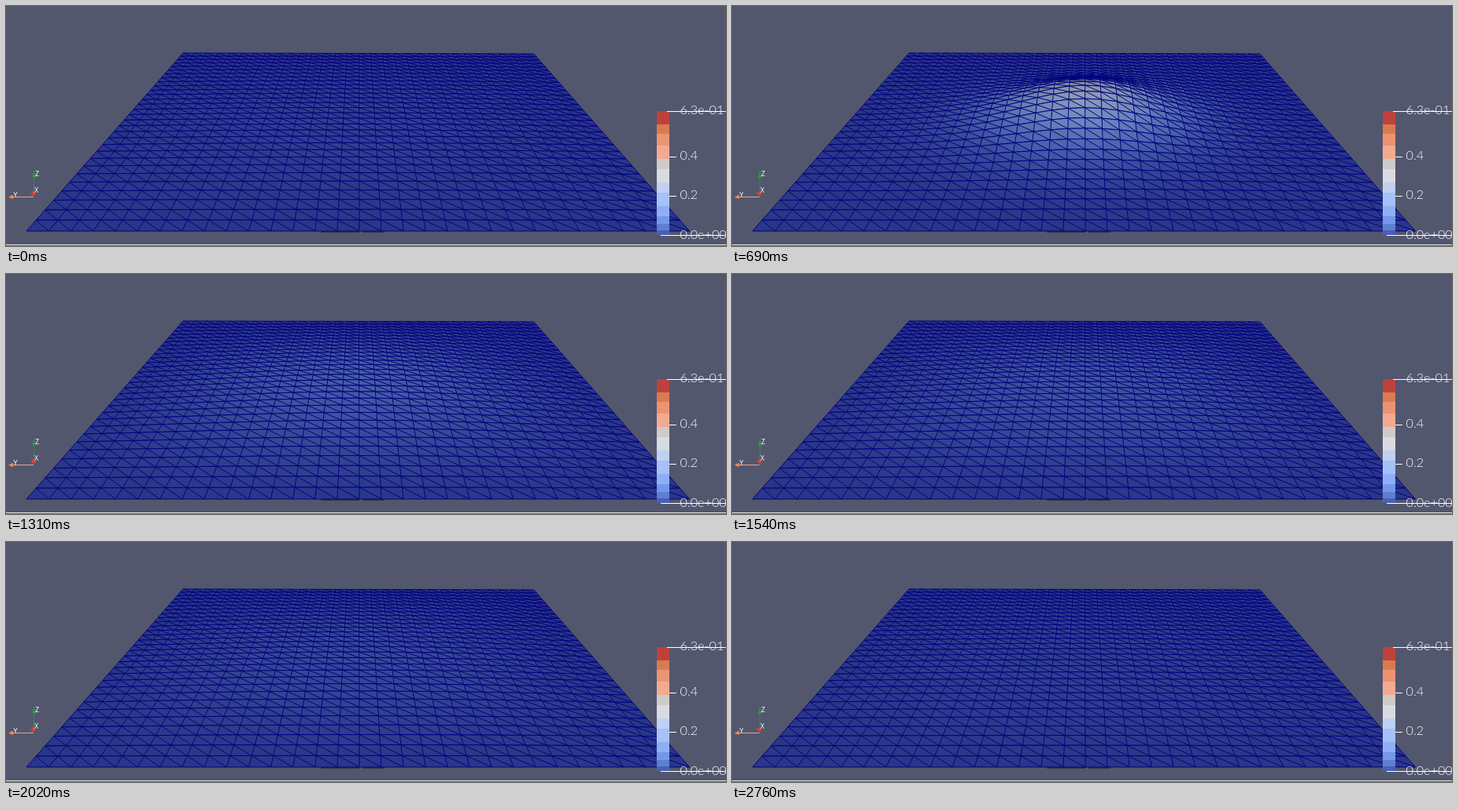
An HTML page with a canvas for the animation above (2840 ms loop, 915 by 306 pixels).

```html
<!DOCTYPE html>
<html lang="en">
<head>
<meta charset="utf-8">
<title>Heat diffusion</title>
<style>
html, body { margin: 0; width: 100%; height: 100%; overflow: hidden; background: #52576e; }
canvas, svg { position: absolute; left: 0; top: 0; display: block; }
.scale { font: 300 16.2px Lato, "Open Sans", sans-serif; fill: #fff; }
.axis { font: 9px "Open Sans", Arial, sans-serif; fill: #fff; }
</style>
</head>
<body>
<canvas id="view" width="915" height="306"></canvas>
<svg width="915" height="306" viewBox="0 0 915 306">
  <path d="M400 288H449M453 288H481" stroke="#10101c"/>
  <path d="M0 304.5H915" stroke="#eeeef0"/>
  <g id="bar" shape-rendering="crispEdges"></g>
  <path d="M840 134.5H915M843 192.5H852M843 242.5H852M832 292.5H915" stroke="#fff" fill="none"/>
  <g class="scale">
    <text x="856.5" y="138">6.3e-01</text>
    <text x="856.5" y="196">0.4</text>
    <text x="856.5" y="246">0.2</text>
    <text x="856.5" y="296.5">0.0e+00</text>
  </g>
  <path d="M8 243.5H35" stroke="#e5a58c"/>
  <path d="M3 243.5L9 240.8V246.2Z" fill="#ee8a55"/>
  <path d="M35.5 240V216" stroke="#3d8a4c"/>
  <path d="M35.5 210L38 219H33Z" fill="#2a9a38"/>
  <circle cx="35" cy="239" r="2.8" fill="#c8483e"/>
  <g class="axis">
    <text x="9.5" y="244">Y</text>
    <text x="37" y="217">Z</text>
    <text x="36" y="238">X</text>
  </g>
</svg>
<script>
const N = 30, SIDE = 4, DT = 0.04, MAX = 0.63;
const LOOP = 2840, START = 510, STEPS = 50;
const ticks = [0, 70, 150, 230, 300, 370, 450, 540, 620, 690, 770, 850,
  1000, 1080, 1160, 1230, 1310, 1390, 1470, 1540, 1630, 1700, 1780, 1860, 1940, 2020,
  2120, 2200, 2280, 2360, 2440, 2520, 2600, 2670, 2760];
const coolWarm = [[59, 76, 192], [98, 130, 234], [141, 176, 254], [184, 208, 249],
  [221, 221, 221], [245, 196, 173], [244, 152, 122], [222, 96, 77], [180, 4, 38]];
const ctx = document.getElementById('view').getContext('2d');

// Legend: bottom edge and colour of each band, from the top
const bands = [[151, '#be423b'], [163, '#d97b50'], [178, '#ec9472'], [195, '#f2ab92'],
  [208, '#cfcbc9'], [225, '#d9dbe2'], [238, '#c0d0f3'], [255, '#a6c0f8'],
  [268, '#8eaff5'], [278, '#7397ea'], [286, '#5d7fd0'], [292, '#4a60b4']];
let edge = 134;
document.getElementById('bar').innerHTML = bands.map(([y, fill]) => {
  const rect = `<rect x="827" y="${edge}" width="16" height="${y - edge}" fill="${fill}"/>`;
  edge = y;
  return rect;
}).join('');

// Sine modes of a Gaussian on a square held at zero along its rim
const modes = [];
for (let m = 1; m < N; m += 2) {
  const wave = Array.from({ length: N + 1 }, (_, i) => Math.sin(m * Math.PI * i / N));
  let c = 0;
  wave.forEach((w, i) => {
    const x = SIDE * (i / N - 0.5);
    c += w * Math.exp(-5 * x * x) * 2 / N;
  });
  modes.push({ wave, c, rate: (m * Math.PI / SIDE) ** 2 });
}

// Heat equation after n implicit Euler steps
function solve(n) {
  const rows = modes.map(a => {
    const row = new Array(N + 1).fill(0);
    for (const b of modes) {
      const k = a.c * b.c * (1 + DT * (a.rate + b.rate)) ** -n;
      for (let i = 0; i <= N; i++) row[i] += k * b.wave[i];
    }
    return row;
  });
  return Array.from({ length: N + 1 }, (_, j) =>
    Array.from({ length: N + 1 }, (_, i) =>
      modes.reduce((s, a, m) => s + a.wave[j] * rows[m][i], 0)));
}

// The camera is turned very slightly, so depth also grows to the right
function project(i, j, h) {
  const u = i / N, v = j / N;
  const far = 1 + 0.894 * v + 0.0084 * u, z = far - 0.0885 * h;
  return [450 + (-424 + 846 * u - 2 * v) / z,
    153 + (481 + 4 * u - 347 * far - 195.5 * h) / z];
}

function tint(h, sx, sy) {
  const p = Math.min(Math.max(h / MAX, 0), 0.9999) * 8, k = Math.floor(p);
  const lit = 0.75 * (0.94 + 0.34 * sy - 0.06 * sx) / Math.hypot(sx, sy, 1);
  const rgb = coolWarm[k].map((v, c) => Math.round(lit * (v + (coolWarm[k + 1][c] - v) * (p - k))));
  return `rgb(${rgb})`;
}

function tri(a, b, c, fill) {
  ctx.fillStyle = fill;
  ctx.beginPath();
  ctx.moveTo(...a);
  ctx.lineTo(...b);
  ctx.lineTo(...c);
  ctx.fill();
}

function draw(n) {
  const u = solve(n), cell = SIDE / N;
  const pts = u.map((row, j) => row.map((h, i) => project(i, j, h)));
  ctx.fillStyle = '#52576e';
  ctx.fillRect(0, 0, 915, 306);
  ctx.strokeStyle = '#02027e';
  ctx.lineWidth = 1;
  ctx.lineJoin = 'round';
  for (let j = N - 1; j >= 0; j--) {
    const front = pts[j], back = pts[j + 1];
    for (let i = 0; i < N; i++) {
      const a = u[j][i], b = u[j][i + 1], c = u[j + 1][i], d = u[j + 1][i + 1];
      tri(back[i], back[i + 1], front[i + 1],
        tint((b + c + d) / 3, (d - c) / cell, (d - b) / cell));
      tri(front[i], front[i + 1], back[i],
        tint((a + b + c) / 3, (b - a) / cell, (c - a) / cell));
    }
    ctx.beginPath();
    for (const line of [back, front]) {
      line.forEach((p, i) => i ? ctx.lineTo(...p) : ctx.moveTo(...p));
    }
    for (let i = 0; i <= N; i++) {
      ctx.moveTo(...front[i]);
      ctx.lineTo(...back[i]);
      if (i < N) ctx.lineTo(...front[i + 1]);
    }
    ctx.stroke();
  }
}

let shown = -1;
const begin = performance.now();
function frame() {
  const t = Math.max(0, performance.now() - begin) % LOOP;
  const tick = ticks.filter(v => v <= t).pop();
  const n = 1 + Math.floor((tick - START + LOOP) % LOOP * STEPS / LOOP);
  if (n !== shown) draw(shown = n);
  requestAnimationFrame(frame);
}
frame();
</script>
</body>
</html>
```
